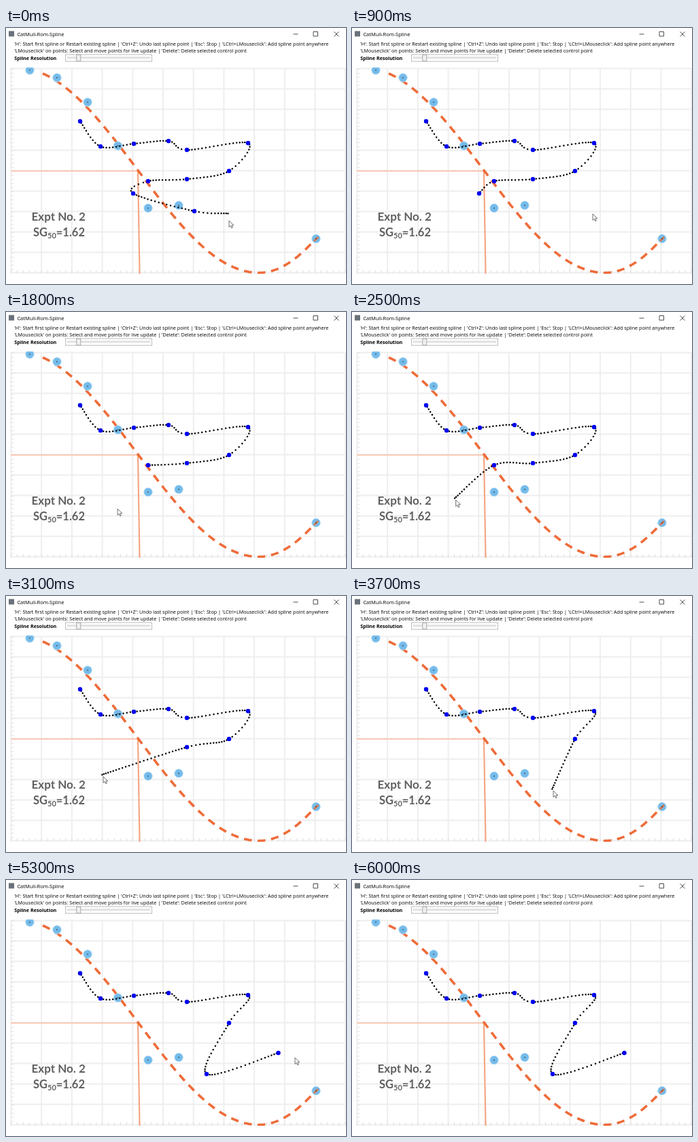
An HTML page that plays this animation: 500x376 px, repeating every 6600 ms.

```html
<!DOCTYPE html>
<html lang="en">
<head>
<meta charset="utf-8">
<title>CatMull-Rom-Spline</title>
<style>
  html, body { margin: 0; width: 100%; height: 100%; overflow: hidden; background: #fff; }
  svg { display: block; width: 500px; height: 376px; }
  text { font-family: "Open Sans", "Noto Sans", sans-serif; font-size: 7.2px; fill: #000; white-space: pre; }
  .title { font-size: 7.5px; }
  .bold { font-weight: 700; }
  .label { filter: blur(.75px); }
  .label text { font: 700 17px Lato, sans-serif; fill: #606060; }
  .label .sub { font-size: 11px; }
  .thin { fill: none; stroke: #222; stroke-width: .8; }
  .round { fill: none; stroke-linecap: round; }
</style>
</head>
<body>
<svg viewBox="0 0 500 376">
  <defs>
    <clipPath id="plotArea"><rect x="6" y="58" width="494" height="303"/></clipPath>
    <filter id="soft" x="-5%" y="-5%" width="110%" height="110%"><feGaussianBlur stdDeviation=".7"/></filter>
  </defs>

  <rect x="4" y="4.5" width="8" height="8" fill="#69727a"/>
  <text class="title" x="16.4" y="11.5">CatMull-Rom-Spline</text>
  <path class="thin" d="M422.5 9h7M452 5.5h6.5v6.5h-6.5zM482.5 5.5l7 7m0-7l-7 7"/>
  <text x="12.2" y="26.3">'H': Start first spline or Restart existing spline | 'Ctrl+Z': Undo last spline point | 'Esc': Stop | 'LCtrl+LMouseclick': Add spline point anywhere</text>
  <text x="12.2" y="36.2">'LMouseclick' on points: Select and move points for live update | 'Delete': Delete selected control point</text>
  <text class="bold" x="12.2" y="46.7">Spline Resolution</text>
  <rect x="87.5" y="39" width="127" height="10" fill="none" stroke="#444" stroke-width=".7" stroke-dasharray="1 1"/>
  <rect x="90.5" y="42.8" width="121" height="2" fill="#e9eaea" stroke="#ccc" stroke-width=".6"/>
  <rect x="103.8" y="39.2" width="6" height="9.6" fill="#f0f0f0" stroke="#999" stroke-width=".8"/>

  <g clip-path="url(#plotArea)">
    <g filter="url(#soft)">
      <path id="grid" fill="none" stroke="#eee" stroke-width="2"/>
      <path d="M9.5 60V360" stroke="#e2e2e2" stroke-width="4" stroke-dasharray="1 5"/>
      <path d="M7 358H500" stroke="#ddd" stroke-width="4" stroke-dasharray="1 7.94"/>
      <path d="M7 210H194" stroke="#f9c9b4" stroke-width="2"/>
      <path d="M194 210L196.5 361" stroke="#f4a685" stroke-width="2.2"/>
      <path id="trend" fill="none" stroke="#ee6c3a" stroke-width="3.6" stroke-dasharray="11.5 8.5"/>
      <g id="samples"></g>
      <path d="M453 313l6-6" stroke="#d9784f" stroke-width="3"/>
    </g>
    <path id="centres" class="round" stroke="#123" stroke-width="1.6"/>
  </g>
  <g class="label">
    <text x="37.5" y="283">Expt No. 2</text>
    <text x="40" y="306" style="font-size:16.5px">SG<tspan class="sub" dy="3">50</tspan><tspan dy="-3">=1.62</tspan></text>
  </g>

  <path id="dots" class="round" stroke="#000" stroke-width="2.5"/>
  <path id="knots" class="round" stroke="#0000f0" stroke-width="6.4"/>
  <path id="cursor" d="M0 0v9.4l2.2-2 1.5 3.4 1.6-.7-1.5-3.3h3z" fill="#fff" stroke="#444" stroke-width=".75"/>
</svg>
<script>
const LOOP = 6600, STEP = 100;
const $ = id => document.getElementById(id);
const range = (n, f) => Array.from({ length: n }, (_, i) => f(i));
const spots = pts => pts.map(([x, y]) => `M${x.toFixed(2)} ${y.toFixed(2)}h.01`).join('');

// Uniform Catmull-Rom curve with doubled end points, sampled by chord length.
function catmullRom(pts, spacing) {
  const curve = pts.slice(0, -1).flatMap((b, i) => {
    const c = pts[i + 1], a = pts[i - 1] || b, d = pts[i + 2] || c;
    const n = Math.ceil(Math.hypot(c[0] - b[0], c[1] - b[1]) / spacing) || 1;
    return range(n, k => {
      const u = k / n;
      return [0, 1].map(j => b[j] + u / 2 * (c[j] - a[j]
        + u * (2 * a[j] - 5 * b[j] + 4 * c[j] - d[j])
        + u * u * (3 * (b[j] - c[j]) + d[j] - a[j])));
    });
  });
  return [...curve, pts[pts.length - 1]];
}

// Cosine valley, a little steeper on its right side.
function trendAt(x) {
  const fromLow = x - 372;
  return 209 + 150.5 * Math.cos(fromLow / (fromLow < 0 ? 113.3 : 99.5));
}

$('grid').setAttribute('d',
  range(12, i => `M${7.5 + i * 44.7} 59V361`).join('') +
  range(11, i => `M7 ${59.5 + i * 30}H500`).join(''));
$('trend').setAttribute('d', 'M' + range(202, i => [54 + i * 2, trendAt(54 + i * 2)]).join('L'));

const samples = [[35, 62], [75, 73], [120, 109], [164.5, 173], [209, 264.5], [254, 260.5], [456, 309.5]];
$('samples').innerHTML = samples.map(([x, y]) =>
  `<circle cx="${x}" cy="${y}" r="6.2" fill="#74bbea" stroke="#b4dcf5"/>`).join('');
$('centres').setAttribute('d', spots(samples));

const base = [[109, 137], [139, 174], [188, 170], [239, 166], [266, 179], [356, 169], [328, 210]];
const undone = [[266, 222], [209, 225], [187, 243], [277, 269]];
const added = [[295, 285], [400.5, 254]];

// One undo every 850 ms; the live end vanishes until the mouse moves again.
const UNDO_EVERY = 850, UNDO_SHIFT = 50;
const ADD_AT = 3900, ADD_EVERY = 600, STOP_AT = 5300, LEAVE_AT = 6000;

function knotsAt(t) {
  if (t >= ADD_AT) return [...base, ...added.slice(0, 1 + Math.floor((t - ADD_AT) / ADD_EVERY))];
  const undos = Math.max(0, Math.floor((t - UNDO_SHIFT) / UNDO_EVERY));
  return [...base, ...undone.slice(0, undone.length - undos)];
}

function isLive(t) {
  const justUndone = t > UNDO_EVERY && t < ADD_AT && (t - UNDO_SHIFT) % UNDO_EVERY < STEP;
  return t < STOP_AT && !justUndone;
}

// Mouse moves: start, end, place reached.
const moves = [[0, 500, 354, 273], [900, 1800, 164, 289], [1800, 3100, 143, 265],
  [3100, 3700, 296, 286], [3800, 4200, 402, 257], [4400, 4700, 425, 261]];

function mouseAt(t) {
  return moves.reduce(([x, y], [from, to, toX, toY]) => {
    const u = Math.min(1, Math.max(0, (t - from) / (to - from)));
    return [x + (toX - x) * u, y + (toY - y) * u];
  }, [328, 283]);
}

function draw(t) {
  const [x, y] = mouseAt(t);
  const knots = knotsAt(t);
  // The pointer runs ahead of the spline end in its first move.
  const gap = 2.6 + 8 * Math.max(0, 1 - t / 500);
  const path = isLive(t) ? [...knots, [x - 1.6, y - gap]] : knots;
  $('dots').setAttribute('d', spots(catmullRom(path, 5)));
  $('knots').setAttribute('d', spots(knots));
  $('cursor').setAttribute('transform', `translate(${x} ${y})`);
  $('cursor').setAttribute('visibility', t < LEAVE_AT ? 'visible' : 'hidden');
}

const start = performance.now();
let shown = -1;
function tick() {
  const t = Math.floor((performance.now() - start) % LOOP / STEP) * STEP;
  if (t !== shown) draw(shown = t);
  requestAnimationFrame(tick);
}
tick();
</script>
</body>
</html>
```
